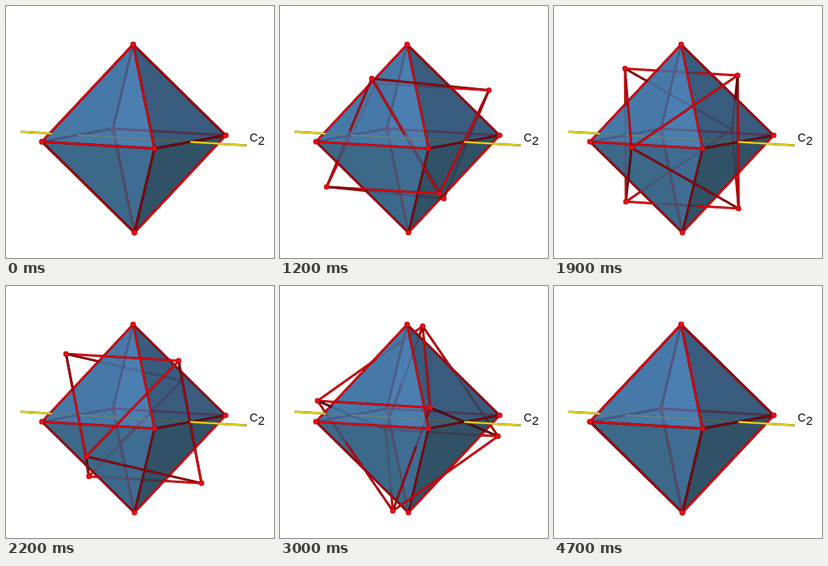
An HTML page with a canvas for the animation above (4800 ms loop, 336x316 px).

```html
<!DOCTYPE html>
<html>
<head>
<meta charset="utf-8">
<style>
html, body { margin: 0; width: 100%; height: 100%; overflow: hidden; background: #fff; }
canvas { display: block; }
</style>
</head>
<body>
<canvas id="stage" width="336" height="316"></canvas>
<script>
const ctx = document.getElementById('stage').getContext('2d');
const LOOP = 4800, TICK = 100, START = 525, STEP = 135, STEPS = 20;

// The three body axes (right, front, top) as x, y and depth towards the viewer
const BASIS = [[115.2, -4, -25], [26, 12.5, 115], [-0.8, -118, 13]];
const CENTER = [160.2, 166.2];
// Direction towards the viewer in body coordinates
const VIEW = [-0.213, 0.973, 0.11];
const LIGHT = [-0.348, -0.348, 0.87];

const VERTS = [[1, 0, 0], [0, 1, 0], [0, 0, 1], [-1, 0, 0], [0, -1, 0], [0, 0, -1]];
const EDGES = [];
for (let i = 0; i < 6; i++)
  for (let j = i + 1; j < 6; j++) if (j - i !== 3) EDGES.push([i, j]);

// Vertex indices and colour
const BACK = [
  [2, 3, 4, 'rgb(88,142,177)'], [2, 4, 0, 'rgb(108,168,220)'],
  [5, 3, 4, 'rgb(88,142,177)'], [5, 4, 0, 'rgb(100,160,210)']
];
const FRONT = [
  [2, 3, 1, 'rgba(64,114,165,.75)'], [2, 1, 0, 'rgba(40,67,95,.75)'],
  [5, 3, 1, 'rgba(51,91,125,.75)'], [5, 1, 0, 'rgba(33,55,67,.75)']
];
const YELLOW = ['#8d8210', '#ecdc1e'];

const norm = p => Math.abs(p[0]) + Math.abs(p[1]) + Math.abs(p[2]);
const mix = (a, b, k) => a.map((v, i) => v + (b[i] - v) * k);
const toSpace = p => [0, 1, 2].map(k => p.reduce((sum, v, i) => sum + v * BASIS[i][k], 0));
const project = p => {
  const [x, y] = toSpace(p);
  return [CENTER[0] + x, CENTER[1] + y];
};

// 0: behind the solid, 1: inside it, 2: in plain view
function layerOf(p) {
  let least = norm(p);
  const inside = least < 1.02;
  for (let i = 0; i < 3; i++) {
    const s = -p[i] / VIEW[i];
    if (s > 0) least = Math.min(least, norm(p.map((v, k) => v + s * VIEW[k])));
  }
  return least > 0.98 ? 2 : inside ? 1 : 0;
}

// Half-turn axis runs through the middle of the right-front edge
function rotate([r, f, t], angle) {
  const c = Math.cos(angle), s = Math.sin(angle);
  const u = (f + r) / 2, w = (f - r) / 2;
  const w2 = w * c + t * s * Math.SQRT1_2;
  return [u - w2, u + w2, t * c - w * s * Math.SQRT2];
}

// One path per layer
function splitLine(a, b) {
  const paths = [new Path2D(), new Path2D(), new Path2D()];
  const n = 80;
  let last = -1;
  for (let i = 0; i < n; i++) {
    const layer = layerOf(mix(a, b, (i + 0.5) / n));
    if (layer !== last) paths[layer].moveTo(...project(mix(a, b, i / n)));
    paths[layer].lineTo(...project(mix(a, b, (i + 1) / n)));
    last = layer;
  }
  return paths;
}

// Rods that point along the light are darker
function redShades(a, b) {
  const d = toSpace(b.map((v, i) => v - a[i]));
  const along = d.reduce((sum, v, i) => sum + v * LIGHT[i], 0) / Math.hypot(...d);
  const red = 90 + 142 * (1 - along * along);
  return [`rgb(${red * 0.64},5,9)`, `rgb(${red},8,14)`];
}

function tube(path, [dark, light], width) {
  ctx.strokeStyle = dark;
  ctx.lineWidth = width;
  ctx.stroke(path);
  ctx.strokeStyle = light;
  ctx.lineWidth = width * 0.6;
  ctx.stroke(path);
}

function ball([x, y]) {
  [[3.4, '#a8060c'], [2.7, '#ee0c14']].forEach(([radius, color]) => {
    ctx.fillStyle = color;
    ctx.beginPath();
    ctx.arc(x, y, radius, 0, 7);
    ctx.fill();
  });
}

function drawFaces(faces) {
  for (const [a, b, c, color] of faces) {
    ctx.fillStyle = color;
    ctx.beginPath();
    [a, b, c].forEach(i => ctx.lineTo(...project(VERTS[i])));
    ctx.fill();
  }
}

const axis = splitLine([-1.005, -1.005, 0], [1.005, 1.005, 0]);

function draw(time) {
  const n = Math.max(0, Math.min(STEPS, Math.floor((time - START) / STEP)));
  const turned = VERTS.map(p => rotate(p, Math.PI * n / STEPS));
  const rods = [VERTS, turned].flatMap(body => EDGES.map(([i, j]) => ({
    paths: splitLine(body[i], body[j]),
    shades: redShades(body[i], body[j])
  })));
  const balls = [...VERTS, ...turned];

  const drawLayer = (layer, alpha) => {
    ctx.globalAlpha = alpha;
    rods.forEach(rod => tube(rod.paths[layer], rod.shades, 2.9));
    tube(axis[layer], YELLOW, 2.8);
    balls.filter(p => layerOf(p) === layer).forEach(p => ball(project(p)));
    ctx.globalAlpha = 1;
  };

  ctx.fillStyle = '#fff';
  ctx.fillRect(0, 0, 336, 316);
  drawFaces(BACK);
  drawLayer(0, 0.35);
  drawLayer(1, 0.7);
  drawFaces(FRONT);
  drawLayer(2, 1);

  ctx.fillStyle = '#000';
  ctx.font = '14px "Liberation Sans", Arial, sans-serif';
  ctx.fillText('C', 305.5, 169.5);
  ctx.font = '15px "Liberation Sans", Arial, sans-serif';
  ctx.fillText('2', 316, 174);
}

function frame() {
  const time = performance.now() % LOOP;
  draw(Math.floor(time / TICK) * TICK);
  requestAnimationFrame(frame);
}
frame();
</script>
</body>
</html>
```
